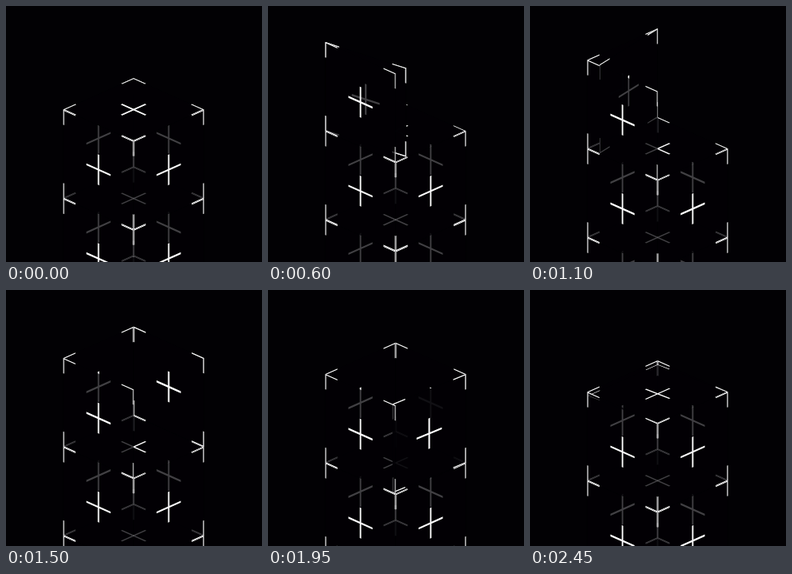
Animation, 320 px wide and 320 px high, one loop 2.5 s. Source, as an HTML page:

```html
<!DOCTYPE html>
<html lang="en">
<head>
<meta charset="utf-8">
<title>Unfolding tower</title>
<style>
  html, body { margin: 0; width: 100%; height: 100%; overflow: hidden; background: #020104; }
  svg { display: block; width: 100vw; height: 100vh; }
</style>
</head>
<body>
<svg viewBox="0 0 320 320">
  <defs>
    <!-- one unit-square panel: smoked glass, corner marks and a centre cross -->
    <g id="panel">
      <path d="M0 0H1V1H0Z" fill="#020104" fill-opacity=".75"/>
      <path id="marks" fill="#fff"/>
    </g>
  </defs>
  <g id="scene"></g>
</svg>
<script>
const LOOP = 2500, STEP = 500, TICK = 50;
const CX = 159.5, TOP = 129.5;
const W = 87.8, H = W / Math.sqrt(5), V = 2 * Math.SQRT2 * H;
const ARM = 0.172, HALF = 0.0105;

// edge vectors of the cube on screen
const P = [W, H], Q = [W, -H], D = [0, V];
const neg = ([x, y]) => [-x, -y];
const left = y => [CX - W, y], right = y => [CX + W, y], back = y => [CX, y - H];

const rect = (x, y, w, h) => `M${x} ${y}h${w}v${h}h${-w}z`;
function marks() {
  let d = rect(0.5 - ARM, 0.5 - HALF, 2 * ARM, 2 * HALF) +
          rect(0.5 - HALF, 0.5 - ARM, 2 * HALF, 2 * ARM);
  for (const x of [0, 1]) for (const y of [0, 1]) {
    d += rect(x * (1 - ARM), y * (1 - HALF), ARM, HALF) +
         rect(x * (1 - HALF), y * (1 - ARM), HALF, ARM);
  }
  return d;
}
document.getElementById("marks").setAttribute("d", marks());
const scene = document.getElementById("scene");

const panel = (o, a, b) =>
  `<use href="#panel" transform="matrix(${[...a, ...b, ...o].map(n => n.toFixed(3))})"/>`;

const backLeft  = y => panel(left(y), Q, D);
const backRight = y => panel(back(y), P, D);
const frontLeft = y => panel(left(y), P, D);
const frontRight = y => panel(right(y), neg(Q), D);
const lid = y => panel(left(y), P, Q);
const cube = y => backLeft(y) + backRight(y) + frontLeft(y) + frontRight(y) + lid(y);

const ease = p => p * p * (3 - 2 * p);
function swing(from, to, p) {
  const a = ease(p) * Math.PI / 2, c = Math.cos(a), s = Math.sin(a);
  return [from[0] * c + to[0] * s, from[1] * c + to[1] * s];
}

// hinge point, hinge edge, start and end of the swinging edge
const folds = [
  y => [left(y + V), P, Q, neg(D)],
  y => [left(y), D, P, Q],
  y => [back(y), D, neg(Q), P],
  y => [right(y), D, neg(P), neg(Q)],
  y => [right(y), neg(Q), D, neg(P)]
];

function draw(t) {
  const base = TOP + V * t / LOOP, y = base - V;
  const step = Math.floor(t / STEP), p = t % STEP / STEP;
  let out = cube(base + 2 * V) + cube(base + V) + cube(base);

  if (step > 1) out += backLeft(y);
  if (step > 2) out += backRight(y);

  // panels not yet unfolded travel together as a stack
  const [o, edge, from, to] = folds[step](y);
  out += panel(o, edge, swing(from, to, p)).repeat(5 - step);

  if (step > 0) out += frontLeft(y);
  if (step > 3) out += frontRight(y);
  scene.innerHTML = out;
}

let last = -1;
function frame() {
  const t = Math.floor(performance.now() % LOOP / TICK) * TICK;
  if (t !== last) draw(last = t);
  requestAnimationFrame(frame);
}
frame();
</script>
</body>
</html>
```
